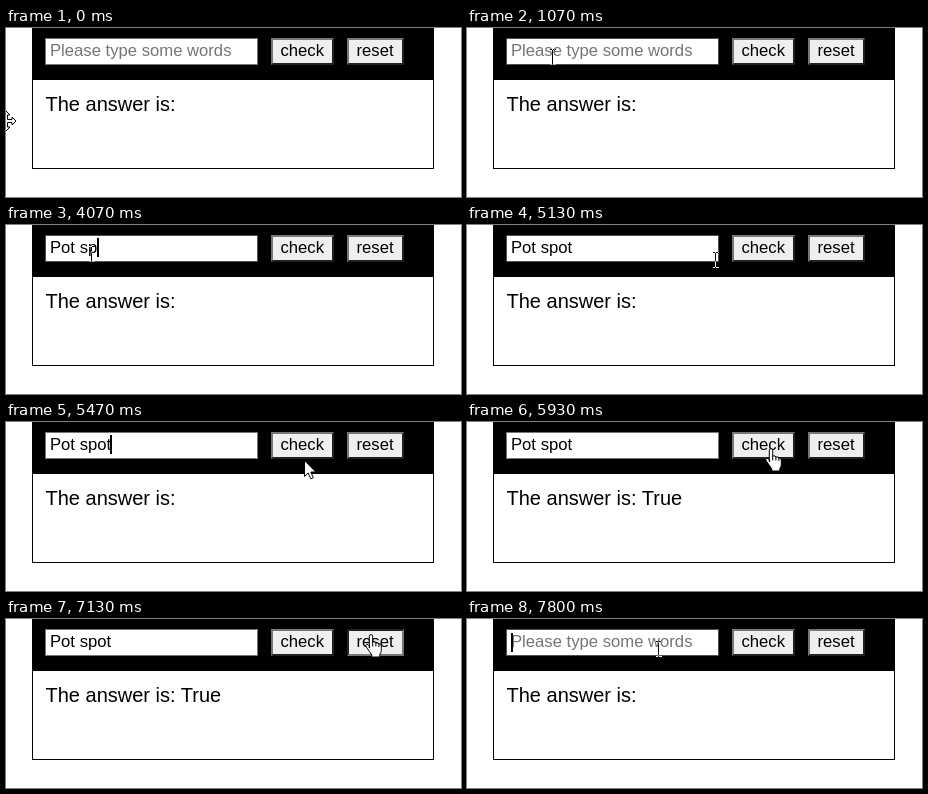
Recreate the animation shown at these times as an HTML page. Size 455x169 px, loop 8 s.

```html
<!DOCTYPE html>
<html lang="en">
<head>
<meta charset="utf-8">
<title>Word check</title>
<style>
  html, body { margin: 0; width: 100%; height: 100%; overflow: hidden; background: #fff; }
  #stage { position: relative; width: 455px; height: 169px; overflow: hidden; isolation: isolate; background: #fff; }
  #stage > * { position: absolute; box-sizing: border-box; }
  .panel { left: 26px; top: -2px; width: 402px; height: 143px; border: 1px solid #000; }
  .bar { left: 26px; top: 0; width: 402px; height: 52px; background: #000; }
  .control { top: 10px; height: 27px; border: 2px outset #767676; background: #efefef; }
  .control.pressed { border-style: inset; }
  #field { left: 39px; width: 213px; border: 1px solid #767676; background: #fff; }
  #field.hover { border-color: #4f4f4f; }
  #check { left: 265px; width: 63px; }
  #reset { left: 341px; width: 57px; }
  #labels { left: 0; top: 0; }
  text { font-family: "Liberation Sans", Arial, sans-serif; font-size: 16.667px; white-space: pre; }
  .answer { font-size: 20px; }
  .cursor { left: 0; top: 0; width: 1px; height: 1px; overflow: visible; fill: #fff; stroke: #000; stroke-linejoin: round; }
  #beam { fill: none; stroke: #fff; mix-blend-mode: difference; shape-rendering: crispEdges; }
</style>
</head>
<body>
<div id="stage">
  <div class="panel"></div>
  <div class="bar"></div>
  <div id="field" class="control"></div>
  <div id="check" class="control"></div>
  <div id="reset" class="control"></div>
  <svg id="labels" width="455" height="169">
    <text id="hint" x="44" y="28" fill="#757575">Please type some words</text>
    <text id="typed" x="44" y="28"></text>
    <text x="274.5" y="28">check</text>
    <text x="350.5" y="28">reset</text>
    <text id="answer" class="answer" x="39.5" y="83"></text>
    <rect id="caret" width="2" height="19"/>
  </svg>
  <svg id="move" class="cursor"><path d="M0-10 4-6H1.5V-1.5H6V-4L10 0 6 4V1.5H1.5V6H4L0 10-4 6H-1.5V1.5H-6V4L-10 0-6-4V-1.5H-1.5V-6H-4Z"/></svg>
  <svg id="arrow" class="cursor"><path d="M.5.5V16.5L4.2 13 6.8 18.8 9.3 17.7 6.8 12H11.8Z"/></svg>
  <svg id="beam" class="cursor"><path d="M.5-6.5V7.5M-2.5-7H0M1-7H3.5M-2.5 8H0M1 8H3.5"/></svg>
  <svg id="hand" class="cursor"><path d="M-1.7 13V1.3a1.7 1.7 0 0 1 3.4 0V7q3-.8 3.2 1 2.8-.6 3 1 2.4-.4 2.4 2v4.5q0 2-1.5 4V22h-8v-2q-2-3-5.5-8-1.2-2 .4-2.6 1.6-.3 3 2z"/><path fill="none" d="M1.7 7V11.5M4.9 8V11.5M7.9 9v3"/></svg>
</div>
<script>
// All times are in ticks of 1/15 s
const TICKS = 120, BLINK = 8;
const PHRASE = "Pot spot";
const keyTicks = [23, 31, 33, 46, 56, 61, 62, 65];
const click = { field: 8, check: 87, checked: 89, reset: 107, cleared: 108, again: 116 };

const $ = id => document.getElementById(id);
const between = (v, a, b) => v >= a && v < b;
const easeOut = k => 1 - (1 - k) ** 2;

const moves = [
  { from: 0, to: 11, x: 85, y: 28 },
  { from: 73, to: 77, x: 248, y: 34 },
  { from: 77, to: 84, x: 302, y: 38 },
  { from: 84, to: 87, x: 304, y: 27 },
  { from: 100, to: 107, x: 365, y: 16 },
  { from: 108, to: 117, x: 191, y: 29 }
];

function pointerAt(tick) {
  let x = 0, y = 93;
  for (const m of moves) {
    const k = easeOut(Math.min(1, Math.max(0, (tick - m.from) / (m.to - m.from))));
    x += (m.x - x) * k;
    y += (m.y - y) * k;
  }
  return [Math.round(x), Math.round(y)];
}

function isOver(id, x, y) {
  const el = $(id), left = el.offsetLeft, top = el.offsetTop;
  return between(x, left, left + el.offsetWidth) && between(y, top, top + el.offsetHeight);
}

function drawPointer(tick) {
  const [x, y] = pointerAt(tick);
  const over = ["field", "check", "reset"].find(id => isOver(id, x, y));
  const shape = tick === 0 ? "move" : !over ? "arrow" : over === "field" ? "beam" : "hand";
  for (const id of ["move", "arrow", "beam", "hand"]) {
    $(id).style.display = id === shape ? "block" : "none";
  }
  $(shape).style.transform = `translate(${x}px, ${y}px)`;
  $("field").classList.toggle("hover", over === "field");
  $("check").classList.toggle("pressed", between(tick, click.check, click.checked));
  $("reset").classList.toggle("pressed", between(tick, click.reset, click.cleared));
}

function drawText(tick) {
  const cleared = tick >= click.cleared;
  const value = cleared ? "" : PHRASE.slice(0, keyTicks.filter(k => k <= tick).length);
  $("typed").textContent = value;
  $("hint").style.display = value ? "none" : "";
  $("answer").textContent = "The answer is:" + (between(tick, click.checked, click.cleared) ? " True" : "");

  const focused = between(tick, click.field, click.check) || tick >= click.again;
  const since = Math.max(...[click.field, click.again, ...keyTicks].filter(k => k <= tick));
  const lit = Math.floor((tick - since) / BLINK) % 2 === 0;
  const width = value ? $("typed").getComputedTextLength() : 0.2;
  $("caret").style.display = focused && lit ? "" : "none";
  $("caret").setAttribute("x", Math.floor(43.86 + width));
  $("caret").setAttribute("y", value ? 13 : 14);
}

const start = performance.now();
function draw(now) {
  const elapsed = Math.max(0, now - start);
  const tick = Math.floor((elapsed + 4) * 15 / 1000) % TICKS;
  drawPointer(tick);
  drawText(tick);
  requestAnimationFrame(draw);
}
draw(start);
</script>
</body>
</html>
```
